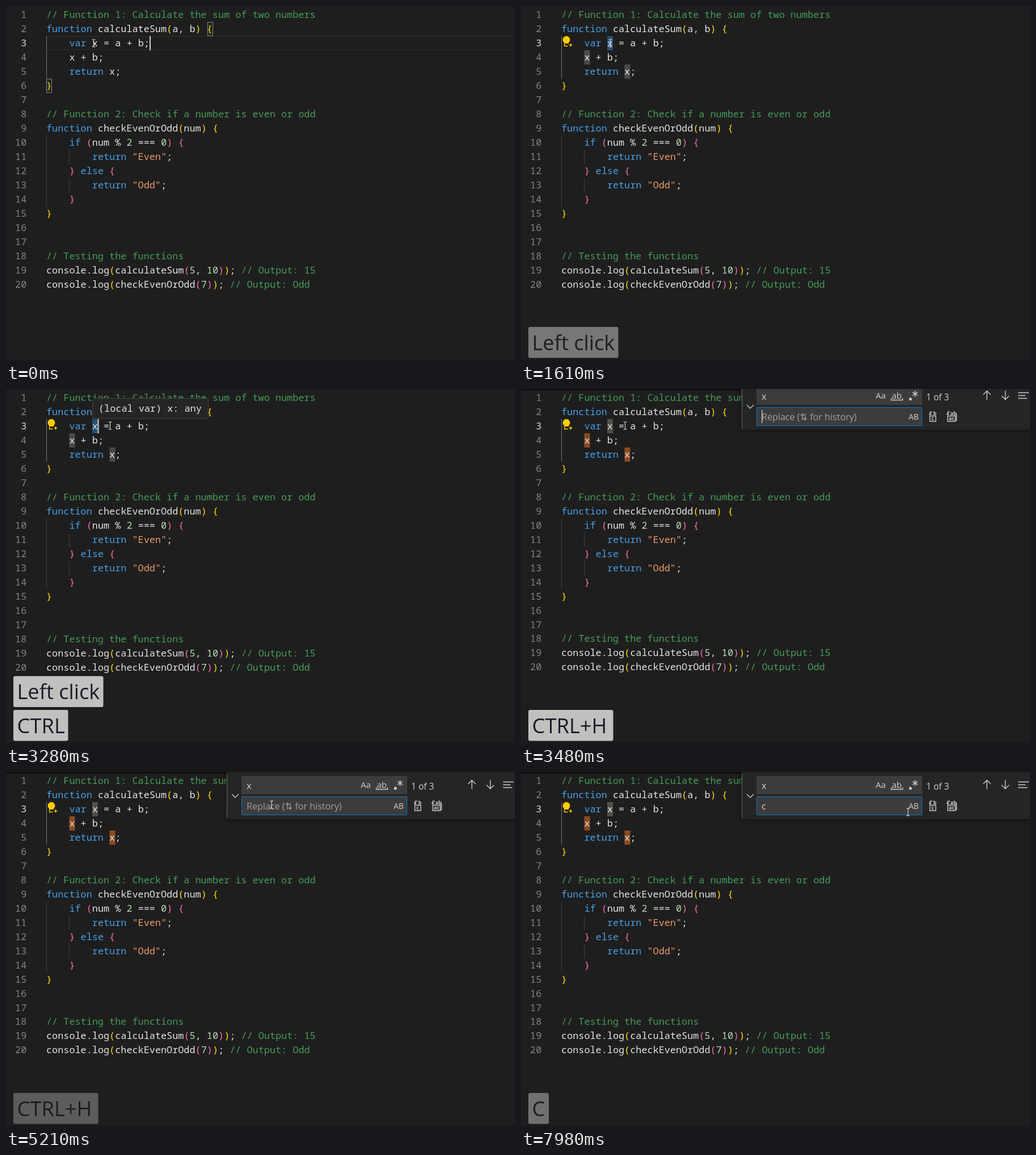
An HTML page for the animation above (8000 ms loop, 897 by 625 pixels).

```html
<!DOCTYPE html>
<html lang="en">
<head>
<meta charset="utf-8">
<title>Find and replace in an editor</title>
<style>
  html, body { margin: 0; width: 100%; height: 100%; overflow: hidden; background: #1e1e1e; }
  svg { display: block; width: 100%; height: 100%; }
  text { white-space: pre; }
  .code { font: 16.84px "Noto Sans Mono", monospace; fill: #e4e4e4; font-variant-ligatures: none; }
  .num { text-anchor: end; fill: #858585; }
  .num.on { fill: #dcdccb; }
  .comment { fill: #479c59; }
  .word { fill: #47a0e8; }
  .string { fill: #ec9a68; }
  .digit { fill: #b9dcb4; }
  .b0 { fill: #ffe000; }
  .b1 { fill: #ff6bb5; }
  .guide { stroke: #404040; }
  .guide.on { stroke: #747474; }
  .ui { font: 16.1px "Open Sans", "DejaVu Sans", sans-serif; fill: #d0d0d0; }
  .icon { fill: none; stroke: #cdcdcd; stroke-width: 1.4; }
  .key { font: 36.3px "Open Sans", sans-serif; fill: #1b1b29; }
  .caret { fill: #d0d0cc; }
  #panel { filter: drop-shadow(0 0 4px rgba(0, 0, 0, .5)); }
</style>
</head>
<body>
<svg viewBox="0 0 897 625">
  <rect width="897" height="625" fill="#1e1e1e"/>
  <rect y="622" width="897" height="3" fill="#191919"/>

  <g id="idle">
    <path d="M71 53.5H897M71 77H897" stroke="#2b2b2b" stroke-width="1.5"/>
    <path d="M355.5 28.5h9v24h-9zM71.5 128.5h9v24h-9z" fill="#1c261c" stroke="#888"/>
  </g>

  <g id="marks">
    <rect id="mark3" x="152" y="53" width="10" height="25"/>
    <rect class="use" x="111.5" y="78" width="10" height="25"/>
    <rect class="use" x="182.5" y="103" width="10" height="25"/>
  </g>

  <path class="guide on" d="M71.5 53V128"/>
  <path class="guide" d="M71.5 228V353M111.5 253V278M111.5 303V328"/>

  <g id="code" class="code"></g>

  <g id="bulb" fill="#fc0">
    <path d="M80 53a6.5 6.5 0 0 1 4 11.5V66H76V64.500A6.500 6.500 0 0 1 80 53z"/>
    <path d="M76.700 66V70.500H82.500" fill="none" stroke="#fc0" stroke-width="1.500"/>
    <path d="M87.500 64.500l1.200 3 3 1.200-3 1.200-1.200 3-1.200-3-3-1.200 3-1.200z" stroke="#1e1e1e" stroke-width=".6"/>
  </g>

  <rect id="endCaret" class="caret" x="253" y="53" width="2" height="25"/>
  <rect id="varCaret" class="caret" x="161.500" y="53" width="2" height="25"/>

  <g id="hint">
    <rect x="152.500" y="16.500" width="204" height="35.500" rx="3" fill="#252526" stroke="#454545"/>
    <text class="code" x="163" y="40">(local var) x: any</text>
  </g>

  <rect id="topShade" width="897" height="3" fill="#0f0f0f"/>
  <g id="panel">
    <rect x="389" y="-20" width="520" height="103" rx="3" fill="#252526"/>
    <path d="M389.500 3V81" stroke="#4a4a4a" stroke-width="2"/>
    <rect x="415" y="7" width="292" height="32" fill="#3c3c3c"/>
    <rect x="415.500" y="43.500" width="291" height="32" rx="1" fill="#3c3c3c" stroke="#0a7cc9"/>
    <text class="ui" x="424" y="30">x</text>
    <text class="ui" id="field" x="424" y="66"></text>
    <text class="ui" x="714" y="31" style="font-size:15.500px">1 of 3</text>
    <text class="ui" x="625" y="28" style="font-size:15px">Aa</text>
    <text class="ui" x="653.500" y="28" style="font-size:15px">ab</text>
    <text class="ui" x="683" y="64.500" style="font-size:14px">AB</text>
    <rect x="684" y="26.500" width="4.500" height="4.500" fill="#cdcdcd"/>
    <g class="icon">
      <path d="M652.500 27V30.500H672.500V27"/>
      <path d="M694.500 14V25M690 16.700L699 22.300M699 16.700L690 22.300"/>
      <path d="M398 39l6 6 6-6"/>
      <path d="M821 30V14.500M814.500 21L821 14.500 827.500 21"/>
      <path d="M853.500 14V29.500M847 23L853.500 29.500 860 23"/>
      <path d="M876 17.500H895M876 22.500H889M876 27.500H892"/>
      <path d="M720.500 58.500h10.500v9.500h-10.500zM725 51.500h-4v5m-2-2l2 2 2-2"/>
      <path d="M752 58.500h13.500v9.500h-13.500zM765.500 56h2v10h-2M756 51.500h-4v5m-2-2l2 2 2-2"/>
    </g>
    <g class="ui" style="font-size:9px;font-weight:700">
      <text x="726.500" y="57">b</text><text x="723.200" y="66.300">c</text>
      <text x="756.500" y="57">ab</text><text x="753.800" y="66.300">ac</text>
    </g>
    <rect id="fieldCaret" class="caret" y="48" width="1.300" height="23"/>
  </g>

  <g id="title">
    <rect x="474.500" y="69.500" width="124" height="23" fill="#2b2b2b" stroke="#767676"/>
    <text class="ui" x="481" y="85" style="font-size:10.900px;fill:#fff">Replace (⇅ for history)</text>
  </g>

  <g id="upper" transform="translate(0 -59.500)"><rect x="13" y="565" height="54.500" rx="3" fill="#c0c0be"/><text class="key" x="19.500" y="605.500"></text></g>
  <g id="lower"><rect x="13" y="565" height="54.500" rx="3" fill="#c0c0be"/><text class="key" x="19.500" y="605.500"></text></g>

  <path id="mouse" d="M-3-6.500H-1L0-5.500 1-6.500H3M0-5.500V5.500M-3 6.500H-1L0 5.500 1 6.500H3" fill="none" stroke="#e0e0e0" stroke-width="1.100"/>
</svg>

<script>
const LOOP = 8000;
const $ = id => document.getElementById(id);
const SOURCE = `// Function 1: Calculate the sum of two numbers
function calculateSum(a, b) {
    var x = a + b;
    x + b;
    return x;
}

// Function 2: Check if a number is even or odd
function checkEvenOrOdd(num) {
    if (num % 2 === 0) {
        return "Even";
    } else {
        return "Odd";
    }
}


// Testing the functions
console.log(calculateSum(5, 10)); // Output: 15
console.log(checkEvenOrOdd(7)); // Output: Odd`;

function addText(parent, tag, content, attrs) {
  const el = document.createElementNS("http://www.w3.org/2000/svg", tag);
  for (const name in attrs) el.setAttribute(name, attrs[name]);
  el.textContent = content;
  return parent.appendChild(el);
}

let depth = 0;
function styleOf(token) {
  if (token.startsWith("//")) return "comment";
  if (token[0] === '"') return "string";
  if (/^(function|var|return|if|else)$/.test(token)) return "word";
  if (/^\d+$/.test(token)) return "digit";
  if (/^[({]$/.test(token)) return "b" + depth++ % 2;
  if (/^[)}]$/.test(token)) return "b" + --depth % 2;
  return "";
}

SOURCE.split("\n").forEach((line, i) => {
  const y = 21.4 + i * 24.97;
  addText($("code"), "text", i + 1, { class: i === 2 ? "num on" : "num", x: 36.3, y });
  const row = addText($("code"), "text", "", { x: 71, y });
  for (const token of line.match(/\/\/.*|"[^"]*"|\w+|[(){}]|\s+|[^\w\s(){}"\/]+/g) || [])
    addText(row, "tspan", token, { class: styleOf(token) });
});

// Latest entry whose time has come
const at = (t, track) => track.filter(entry => entry[0] <= t).pop();

// Eased value between timed points
function glide(t, track, k) {
  const i = track.findIndex(point => point[0] > t);
  if (i < 0) return track[track.length - 1][k];
  if (i === 0) return track[0][k];
  const a = track[i - 1], b = track[i];
  const p = (t - a[0]) / (b[0] - a[0]);
  return a[k] + (b[k] - a[k]) * p * p * (3 - 2 * p);
}

const within = (t, ...spans) => spans.some(([from, to]) => t >= from && t < to);
const show = (id, on) => $(id).style.display = on ? "" : "none";

const MOUSE = [
  [0, 154.5, 65.5], [400, 154.5, 65.5], [560, 157.5, 65.5], [1650, 157.5, 65.5],
  [1940, 183.5, 64.5], [4310, 183.5, 64.5], [5010, 468, 57.5],
  [7360, 468, 57.5], [7980, 682, 70.5]
];
const PANEL = [[3330, -95], [3410, -42], [3480, -11], [3550, 0]];
const LOWER = [
  [0, "", 0], [400, "Left click", 1], [1610, "Left click", .55], [1870, "Left click", .38],
  [2560, "Left click", 1], [2960, "CTRL", 1], [3340, "CTRL+H", 1], [4740, "CTRL+H", .75],
  [5010, "CTRL+H", .55], [5210, "CTRL+H", .38], [6270, "C", 1], [7060, "C", .9],
  [7500, "C", .75], [7800, "C", .62], [7980, "C", .51]
];
const UPPER = [
  [0, "", 0], [2960, "Left click", 1], [3340, "", 0],
  [6270, "CTRL+H", .38], [6470, "CTRL+H", .2], [6600, "", 0]
];
const KEY_WIDTH = { "": 0, "Left click": 158.5, "CTRL": 96.5, "CTRL+H": 149.5, "C": 36 };

function drawKey(id, [, name, opacity]) {
  const [box, label] = $(id).children;
  box.setAttribute("width", KEY_WIDTH[name]);
  label.textContent = name;
  $(id).setAttribute("opacity", opacity);
}

function draw(t) {
  const picked = t >= 600, finding = t >= 3410, typed = t >= 6270;
  show("idle", t < 500);
  show("endCaret", t < 500);
  show("marks", picked);
  show("bulb", t >= 800);
  show("varCaret", within(t, [500, 1320], [1800, 2300], [2760, 3340]));

  $("mark3").setAttribute("fill", finding ? "#50504a" : "#264f78");
  document.querySelectorAll(".use").forEach(el => el.setAttribute("fill", finding ? "#8a4b22" : "#4a4a4a"));
  $("code").setAttribute("transform", `translate(0 ${finding ? -.4 : 0})`);

  $("hint").setAttribute("opacity", t < 3340 ? Math.min(1, Math.max(0, (t - 1680) / 200)) : 0);
  show("title", within(t, [5600, 6270]));

  show("topShade", finding);
  show("panel", t >= 3340);
  $("panel").setAttribute("transform", `translate(0 ${at(Math.max(t, 3330), PANEL)[1]})`);
  $("field").textContent = typed ? "c" : "Replace (⇅ for history)";
  $("field").style.fill = typed ? "" : "#a2a2a2";
  show("fieldCaret", within(t, [3410, 3980], [4480, 4950], [5410, 5870], [6270, 6800], [7360, 7860]));
  $("fieldCaret").setAttribute("x", typed ? 431.2 : 424);

  drawKey("lower", at(t, LOWER));
  drawKey("upper", at(t, UPPER));
  $("mouse").setAttribute("transform", `translate(${glide(t, MOUSE, 1)} ${glide(t, MOUSE, 2)})`);
}

const start = performance.now();
function tick() {
  draw((performance.now() - start) % LOOP);
  requestAnimationFrame(tick);
}
tick();
</script>
</body>
</html>
```
